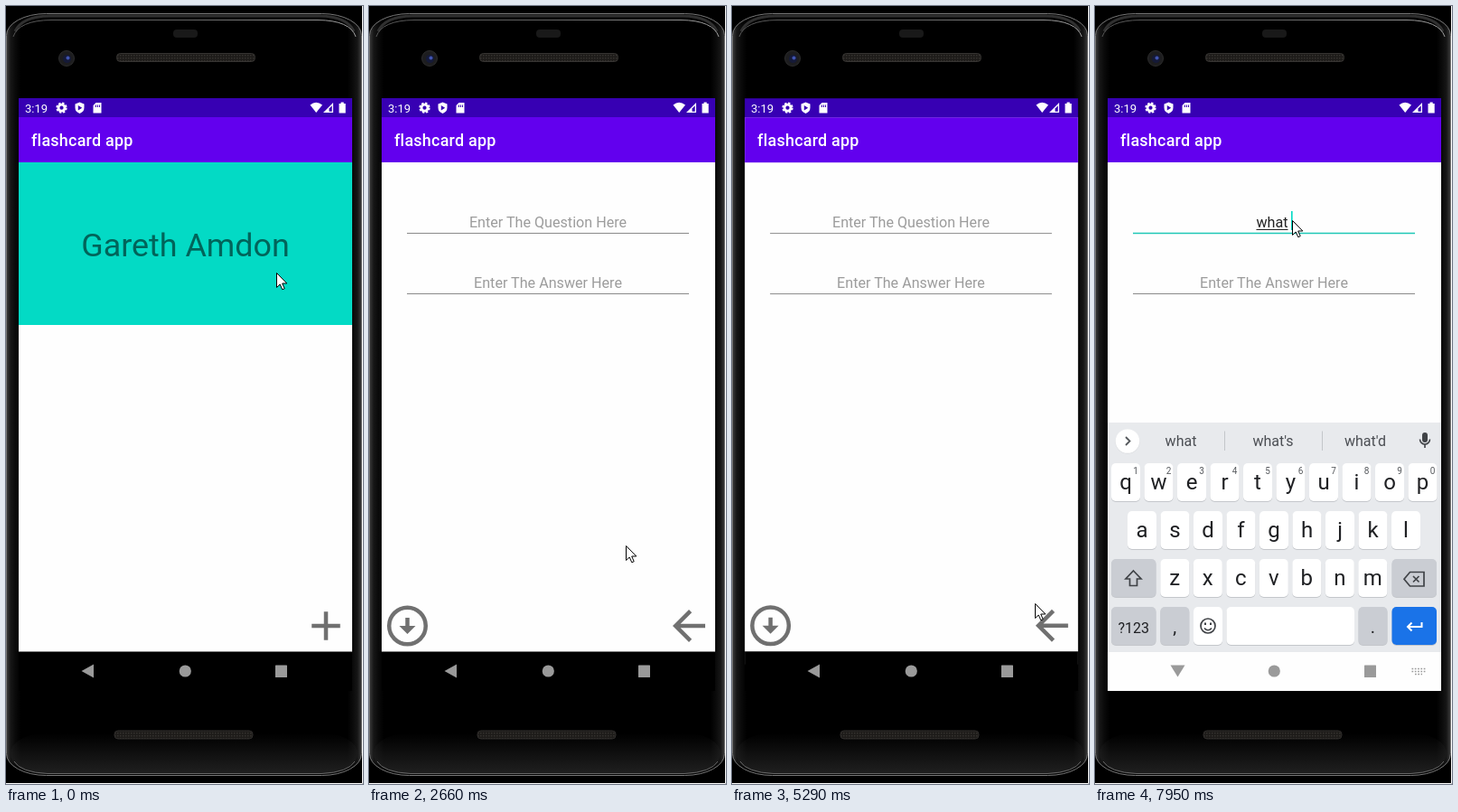
Recreate the animation shown at these times as an HTML page. Size 395 px wide and 861 px high, loop 8000 ms.

```html
<!DOCTYPE html>
<html lang="en">
<head>
<meta charset="utf-8">
<title>Flashcard app</title>
<style>
  html, body { margin: 0; width: 100%; height: 100%; overflow: hidden; background: #000; }
  svg { display: block; width: 395px; height: 861px; }
  text { font-family: Roboto, sans-serif; }
  .mid { text-anchor: middle; }
  .title { font-size: 17.96px; font-weight: 500; letter-spacing: .0125em; fill: #fff; }
  .card { font-size: 35.88px; fill: rgba(0, 0, 0, .54); }
  .field { font-size: 16.14px; fill: #222; }
  .hint { fill: #9c9c9c; }
  .key { font-size: 24px; fill: #1f2023; }
  .num { font-size: 10px; fill: #55585c; }
  .sug { font-size: 16px; fill: #4b4e53; }
</style>
</head>
<body>
<svg viewBox="0 0 395 861">
  <defs>
    <clipPath id="screen"><rect x="14" y="102" width="369" height="656"/></clipPath>
    <linearGradient id="side">
      <stop offset="0" stop-color="#3c3c3c"/><stop offset=".012" stop-color="#161616"/>
      <stop offset=".025" stop-color="#0a0a0a"/><stop offset=".04" stop-color="#000"/>
      <stop offset=".96" stop-color="#000"/><stop offset=".975" stop-color="#0a0a0a"/>
      <stop offset=".988" stop-color="#161616"/><stop offset="1" stop-color="#3c3c3c"/>
    </linearGradient>
    <linearGradient id="chin" x2="0" y2="1">
      <stop offset="0" stop-color="#202020" stop-opacity="0"/><stop offset="1" stop-color="#202020"/>
    </linearGradient>
    <linearGradient id="shine">
      <stop offset="0" stop-color="#555"/><stop offset=".5" stop-color="#666"/><stop offset="1" stop-color="#a0a0a0"/>
    </linearGradient>
    <pattern id="mesh" width="3" height="3" patternUnits="userSpaceOnUse">
      <rect width="3" height="3" fill="#1d1b19"/><rect width="1.5" height="1.5" fill="#35322f"/>
    </pattern>
    <g id="bars">
      <rect x="14" y="102" width="369" height="656"/>
      <rect x="14" y="123" width="369" height="591.500" fill="#fefefe"/>
      <rect x="14" y="102" width="369" height="21" fill="#3700b3"/>
      <rect x="14" y="123" width="369" height="50" fill="#6200ee"/>
      <text class="title" x="28" y="155">flashcard app</text>
    </g>
  </defs>

  <g id="phone">
    <rect width="395" height="861"/>
    <rect x=".5" y="8.5" width="393" height="843" rx="44" ry="24" fill="url(#side)" stroke="#777"/>
    <rect x="5" y="805" width="384" height="45" rx="38" ry="22" fill="url(#chin)"/>
    <path d="M10 28Q18 11.500 48 11H347Q377 11.500 385 28" fill="none" stroke="#303030" stroke-width="3"/>
    <path d="M8 34Q14 16 50 15.500H345Q381 16 387 34" fill="none" stroke="url(#shine)"/>
    <path d="M9 836Q16 848 46 849.500H349Q379 848 386 836" fill="none" stroke="#666"/>
    <path d="M394.500 0V860.500H0" fill="none" stroke="#fff"/>
    <rect x="185" y="26" width="27" height="9" rx="4" fill="#191919"/>
    <circle cx="67" cy="58" r="8.500" fill="#1d1d1f" stroke="#2c2c2c"/>
    <circle cx="67.500" cy="58.500" r="4.500" fill="#151a38"/>
    <circle cx="68.500" cy="57.500" r="2" fill="#4054b0"/>
    <rect x="122.500" y="52.500" width="153" height="9" rx="4" fill="url(#mesh)" stroke="#363432"/>
    <rect x="120" y="802" width="153" height="9" rx="4" fill="url(#mesh)" stroke="#2e2c2a"/>
  </g>

  <g clip-path="url(#screen)">
    <rect x="14" y="102" width="369" height="656"/>
    <g id="home">
      <use href="#bars"/>
      <rect id="card" x="14" y="173" width="369" height="180"/>
      <text id="answer" class="card mid" x="198.500" y="277">Gareth Amdon</text>
      <g id="question" class="card mid">
        <text x="198.500" y="235">Who is the 44th</text>
        <text x="198.500" y="277">President of the United</text>
        <text x="198.500" y="319">States?</text>
      </g>
      <path transform="translate(327 659) scale(2.250)" fill="#707070" d="M19 13h-6v6h-2v-6H5v-2h6V5h2v6h6z"/>
    </g>
    <g id="form">
      <use href="#bars"/>
      <text id="hint" class="field hint mid" x="198" y="244.500">Enter The Question Here</text>
      <text id="typed" class="field" y="244.500"></text>
      <path id="composing" stroke="#222"/>
      <path id="line" d="M42 251.500H354"/>
      <rect id="caret" y="227" width="1.600" height="21" fill="#03dac5"/>
      <text class="field hint mid" x="198" y="311.700">Enter The Answer Here</text>
      <path d="M42 318.500H354" stroke="#8a8a8a"/>
      <g fill="#707070">
        <g transform="translate(15.500 659) scale(2.250)">
          <circle cx="12" cy="12" r="9" fill="none" stroke="#707070" stroke-width="2"/>
          <path d="M13 12V8h-2v4H8l4 4 4-4z"/>
        </g>
        <path transform="translate(327 659) scale(2.250)" d="M20 11H7.830l5.590-5.590L12 4l-8 8 8 8 1.410-1.410L7.830 13H20z"/>
      </g>
    </g>

    <g id="keyboard">
      <rect x="14" y="461" width="369" height="254" fill="#e8eaed"/>
      <rect x="14" y="715" width="369" height="43" fill="#fefefe"/>
      <circle cx="36" cy="482" r="13.500" fill="#d6d8db"/><circle cx="36" cy="481.500" r="13.300" fill="#fff"/>
      <path d="M34 477l4.500 4.500-4.500 4.500" fill="none" stroke="#55585c" stroke-width="1.800"/>
      <g id="strip">
        <path d="M143.500 470.500V492M251.500 470.500V492" stroke="#c3c6ca"/>
      </g>
      <rect x="362" y="472" width="6" height="11" rx="3" fill="#404347"/>
      <path d="M359.500 479.500a5.500 5.500 0 0 0 11 0M365 485v4" fill="none" stroke="#404347" stroke-width="1.600"/>
      <g id="keys"></g>
      <g fill="none" stroke="#404347" stroke-width="1.700">
        <path d="M42.500 625l8.500 9h-4.500v7.500h-8V634h-4.500z"/>
        <path d="M348.500 626.500H364v15.500H348.500L342 634.200zM352 631l6.500 6.500m0-6.500l-6.500 6.500"/>
        <circle cx="125" cy="686" r="8"/>
        <path d="M121 688.500q4 4.500 8 0"/>
        <path d="M122 682.500v2.500M128 682.500v2.500" stroke-width="2"/>
        <path d="M361.500 682v5H346m4.500-4.500l-4.500 4.500 4.500 4.500" stroke="#fff" stroke-width="2"/>
      </g>
    </g>

    <g fill="#9a9a9a">
      <path id="back"/>
      <circle cx="198.300" cy="736" r="6.600"/>
      <rect x="298" y="729.500" width="13" height="13.500" rx=".6"/>
      <path id="imeIcon" d="M350.500 733.500h15M350.500 736.500h15M354 739.500h8" fill="none" stroke="#9a9a9a" stroke-width="1.700" stroke-dasharray="1.700 1.600"/>
    </g>

    <g fill="#fff">
      <text x="21" y="117.600" font-size="13">3:19</text>
      <g fill="none" stroke="#fff">
        <circle cx="61.500" cy="112.700" r="3.500" stroke-width="2.800"/>
        <circle cx="61.500" cy="112.700" r="5.300" stroke-width="1.700" stroke-dasharray="2.400 1.763"/>
      </g>
      <path fill-rule="evenodd" d="M81.500 106.500l5 2v4q0 4.500-5 6.500-5-2-5-6.500v-4zM79.800 110v5.500l4.400-2.700z"/>
      <path fill-rule="evenodd" d="M99.500 107h6v11.500h-9V110zM99 109.500v2.500h1v-2.500zm2 0v2.500h1v-2.500zm2 0v2.500h1v-2.500z"/>
      <path d="M336.500 109.500Q343 104 350 109.500L343.200 118z"/>
      <path d="M351 118L362 107V118z"/>
      <path d="M357.500 116.700V113.500L360.700 110.200V116.700z" fill="#3700b3"/>
      <path d="M368.500 108h2v-1.500h3.200v1.500h2v10.500h-7.200z"/>
    </g>
  </g>
  <path id="cursor" d="M.5.5V16.500L4.200 13 6.800 18.800 9.200 17.700 6.700 12H11.800z" fill="#fff" stroke="#000"/>
</svg>

<script>
const LOOP = 8000;
const $ = id => document.getElementById(id);
const clamp = (v, a = 0, b = 1) => Math.min(b, Math.max(a, v));
const mix = (a, b, p) => a + (b - a) * p;
const show = (id, on) => $(id).setAttribute('visibility', on ? 'visible' : 'hidden');

function add(parent, tag, attrs, text = '') {
  const el = document.createElementNS('http://www.w3.org/2000/svg', tag);
  for (const k in attrs) el.setAttribute(k, attrs[k]);
  el.textContent = text;
  return $(parent).appendChild(el);
}

const TICKS = [0, 120, 250, 370, 510, 640, 760, 890, 1020, 1170, 1290,
  1730, 1880, 2000, 2130, 2270, 2400, 2530, 2660, 2810, 2950, 3080,
  3640, 3760, 3890, 4040, 4180, 4330, 4480, 4600, 4720,
  4990, 5140, 5260, 5400, 5550, 5700, 5850, 5980,
  6130, 6250, 6380, 6530, 6680, 6830, 7200, 7350, 7500, 7650, 7800, 7950];

// Pointer stops: time, x, y.
const STOPS = [[0, 299, 295], [250, 299, 295], [1020, 342, 684], [1290, 347, 680],
  [2000, 347, 680], [2660, 284, 597], [3080, 353, 697], [3890, 353, 697],
  [4330, 353, 525], [4600, 357, 690], [4720, 342, 685], [5140, 342, 685],
  [5980, 221, 246], [6130, 218, 237], [LOOP, 218, 237]];

function addKey(x, y, w, fill, label = '', size = 24) {
  add('keys', 'rect', { x, y: y + 1, width: w, height: 42, rx: 5, fill: '#c4c7cb' });
  add('keys', 'rect', { x, y, width: w, height: 42, rx: 5, fill });
  const t = add('keys', 'text', { x: x + w / 2, y: y + 29, class: 'key mid' }, label);
  t.style.fontSize = size + 'px';
}

const GRAY = '#cacdd3';
[['qwertyuiop', 18, 506], ['asdfghjkl', 36, 559], ['zxcvbnm', 72.3, 612]].forEach(([row, x0, y], r) =>
  [...row].forEach((ch, i) => {
    const x = x0 + i * 36.5;
    addKey(x, y, 32, '#fff', ch);
    if (!r) add('keys', 'text', { x: x + 27, y: y + 11.5, class: 'num mid' }, (i + 1) % 10);
  }));
addKey(18, 612, 49.5, GRAY);
addKey(328.5, 612, 49.5, GRAY);
addKey(18, 665, 49.5, GRAY, '?123', 16);
addKey(72.3, 665, 32, GRAY, ',', 20);
addKey(109, 665, 32, '#fff');
addKey(145.5, 665, 141.5, '#fff');
addKey(291.5, 665, 32, GRAY, '.', 20);
addKey(328.5, 665, 49.5, '#1a73e8');
const slots = [95, 197, 299].map(x => add('strip', 'text', { x, y: 487, class: 'sug mid' }));

// Two-part curve: quick start, very slow settling.
const bezier = (u, a, b, c, d) =>
  (1 - u) ** 3 * a + 3 * u * (1 - u) ** 2 * b + 3 * u * u * (1 - u) * c + u ** 3 * d;
function settle(t) {
  if (t <= 0 || t >= 1) return clamp(t);
  const [xs, ys] = t < .166
    ? [[0, .05, .133, .166], [0, 0, .06, .4]]
    : [[.166, .208, .25, 1], [.4, .82, 1, 1]];
  let lo = 0, hi = 1;
  for (let i = 0; i < 20; i++) {
    const m = (lo + hi) / 2;
    if (bezier(m, ...xs) < t) lo = m; else hi = m;
  }
  return bezier(lo, ...ys);
}

function pose(id, scale, alpha) {
  $(id).setAttribute('transform', `translate(198.5 430) scale(${scale}) translate(-198.5 -430)`);
  $(id).setAttribute('opacity', alpha);
}

const OPEN = 1680, CLOSE = 3604, REOPEN = 4940;
function drawPages(t) {
  const closing = t >= CLOSE && t < REOPEN;
  const start = closing ? CLOSE : t < CLOSE ? OPEN : REOPEN;
  const p = settle((t - start) / 400);
  const fade = clamp((t - start - 50) / 83);
  if (closing) {
    pose('home', mix(.9, 1, p), 1);
    pose('form', mix(1, 1.1, p), 1 - fade);
  } else {
    pose('home', mix(1, 1.05, p), mix(1, .5, fade));
    pose('form', mix(.85, 1, p), fade);
  }
}

function drawCard(t) {
  const flipped = t >= 120;
  $('card').setAttribute('fill', flipped ? '#bb86fc' : '#03dac5');
  show('answer', !flipped);
  show('question', flipped);
}

function drawField(t) {
  const focus = t >= 6250;
  const n = t < 7200 ? 0 : Math.min(4, Math.floor((t - 7200) / 150) + 1) + (t >= 7950);
  const word = 'what'.slice(0, n);
  const typed = $('typed');
  typed.textContent = word;
  const w = n ? typed.getComputedTextLength() : 0;
  const full = w + (n > 4 ? 4 : 0);
  const x = 198 - full / 2;
  typed.setAttribute('x', x);
  $('composing').setAttribute('d', n ? `M${x} 247.5h${w}` : '');
  $('caret').setAttribute('x', x + full - .5);
  $('line').setAttribute('stroke', focus ? '#1fc7b6' : '#8a8a8a');
  $('line').setAttribute('stroke-width', focus ? 1.6 : 1);
  show('hint', !n);
  show('caret', focus && (t < 6830 || t >= 7200));
  const words = n < 4 ? [word, 'what', "what's"] : ['what', "what's", "what'd"];
  slots.forEach((s, i) => s.textContent = n ? words[i] : '');
  $('strip').setAttribute('opacity', n ? 1 : 0);
}

function drawKeyboard(t) {
  const up = t >= 6530;
  const p = clamp((t - 6440) / 330);
  $('keyboard').setAttribute('transform', `translate(0 ${297 * (1 - p) ** 2})`);
  show('keyboard', up);
  show('imeIcon', t >= 6380);
  $('back').setAttribute('d', up ? 'M83.5 729.5H99.5L91.5 742.5z' : 'M83.5 736L97 728.5V743.5z');
}

function drawCursor(t) {
  const i = STOPS.findIndex(s => s[0] > t);
  const [t0, x0, y0] = STOPS[i - 1], [t1, x1, y1] = STOPS[i];
  const u = (t - t0) / (t1 - t0), p = u * u * (3 - 2 * u);
  $('cursor').setAttribute('transform', `translate(${Math.round(mix(x0, x1, p))} ${Math.round(mix(y0, y1, p))})`);
}

function frame() {
  const now = performance.now() % LOOP;
  const t = TICKS.filter(k => k <= now).pop();
  [drawPages, drawCard, drawField, drawKeyboard, drawCursor].forEach(draw => draw(t));
  requestAnimationFrame(frame);
}
frame();
</script>
</body>
</html>
```
